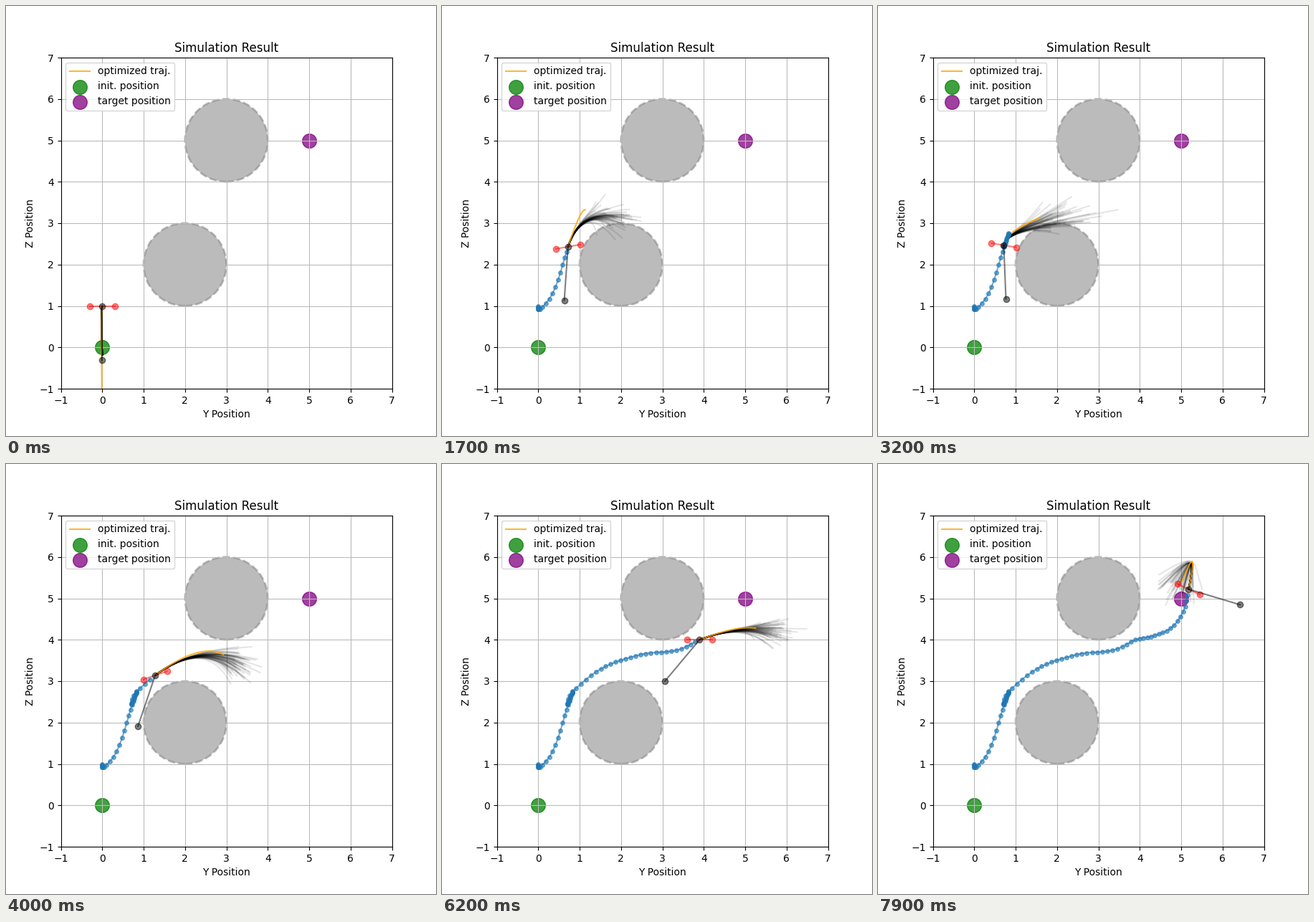
These frames come from a looping animation (600x600 px, 8000 ms). A matplotlib script:

```python
import numpy as np
import matplotlib.pyplot as plt
from matplotlib.animation import FuncAnimation
from matplotlib.collections import LineCollection

FRAMES, STEP_MS = 80, 100
ARM, CABLE = 0.3, 1.3
SAMPLES = 60
LOOKAHEAD = 9                 # steps the plan keeps its present velocity

# step, y, z: waypoints of the flight
PATH = np.array([
    (0, 0, 1), (4, 0, 0.92), (7, 0.1, 0.97), (9, 0.27, 1.17),
    (17, 0.72, 2.43), (24, 0.83, 2.75), (31, 0.71, 2.44), (36, 0.82, 2.73),
    (40, 1.28, 3.14), (50, 2.47, 3.64), (58, 3.46, 3.78), (62, 3.9, 4.0),
    (67, 4.36, 4.1), (72, 4.83, 4.35), (75, 5.05, 4.68), (79, 5.18, 5.22),
])

# step, cable swing, body tilt in degrees
POSE = np.array([
    (0, 0, 0), (9, -10.7, -1.6), (17, -4, 10), (25, 4.6, -24.4),
    (40, -18.7, 19), (50, -84, 8), (62, -40, 0), (66, 0, 3), (72, 55, 12),
    (79, 73.3, -25.8),
])

# step, where the sampled plans and the best plan end, relative to the drone
AIM = np.array([
    (0, 0, -1.2, 0, -2.8), (9, 2.0, 1.45, 0.83, 2.06),
    (25, 0.45, -0.07, 0, -0.28), (33, 1.6, 0.8, 1.0, 0.8),
    (40, 2.1, 0.25, 1.65, 0.5), (50, 1.95, -0.2, 1.8, -0.24),
    (62, 1.85, 0.2, 1.35, 0.28), (72, 0.45, 1.35, 0.3, 1.25),
    (79, -0.3, 0, -0.15, 0.2),
])

T = np.linspace(0, 1, 21)[:, None]


def smooth(table):
    """Cubic Hermite curve through the rows of a table, one value per step."""
    k, v = table[:, 0], table[:, 1:]
    m = np.gradient(v, k, axis=0)
    i = np.arange(FRAMES)
    j = np.clip(np.searchsorted(k, i, "right") - 1, 0, len(k) - 2)
    h = (k[j + 1] - k[j])[:, None]
    s = (i - k[j])[:, None] / h
    return ((1 + 2 * s) * (1 - s) ** 2 * v[j] + s * (1 - s) ** 2 * h * m[j]
            + s * s * (3 - 2 * s) * v[j + 1] + s * s * (s - 1) * h * m[j + 1])


def plan(pos, vel, end):
    """Leave along the velocity, then bend towards the end point."""
    return pos + 2 * T * (1 - T) * LOOKAHEAD * vel + T ** 2 * end


track = smooth(PATH)
velocity = np.gradient(track, axis=0)
pose = np.radians(smooth(POSE))

fig, ax = plt.subplots(figsize=(6, 6), dpi=100)
ax.set_aspect("equal")
ax.set(xlim=(-1, 7), ylim=(-1, 7), title="Simulation Result",
       xlabel="Y Position", ylabel="Z Position")
ax.grid(color="#bbbbbb")

fan = LineCollection([], colors="black", alpha=0.1, linewidths=1.5, zorder=2)
ax.add_collection(fan, autolim=False)
best, = ax.plot([], [], color="orange", alpha=0.8, label="optimized traj.")
for point, color, label in (((0, 0), "green", "init. position"),
                            ((5, 5), "purple", "target position")):
    ax.scatter(*point, s=200, color=color, alpha=0.75, label=label)
for center in ((2, 2), (3, 5)):
    ax.add_patch(plt.Circle(center, 1, color="gray", alpha=0.53,
                            linestyle="--", linewidth=2))
trail, = ax.plot([], [], "o-", color="C0", markersize=4, alpha=0.6)
body, = ax.plot([], [], "o-", color="red", alpha=0.5)
cable, = ax.plot([], [], "o-", color="black", alpha=0.5)
ax.legend(loc="upper left")


def update(i):
    pos, vel = track[i], velocity[i]
    swing, tilt = pose[i]

    arm = ARM * np.array([np.cos(tilt), np.sin(tilt)])
    body.set_data(*np.array([pos - arm, pos + arm]).T)
    load = pos + CABLE * np.array([np.sin(swing), -np.cos(swing)])
    cable.set_data(*np.array([pos, load]).T)
    trail.set_data(*track[:i].T)

    aim = np.array([np.interp(i, AIM[:, 0], col) for col in AIM[:, 1:].T])
    best.set_data(*plan(pos, vel, aim[2:]).T)

    # a slow drone is undecided, so its plans scatter widely sideways
    doubt = np.exp(-(np.hypot(*vel) / 0.05) ** 2)
    spread = min(1, i / 9) * np.array([0.24 + 0.4 * doubt, 0.2])
    ends = np.random.default_rng(i).normal(size=(SAMPLES, 2)) * spread
    mean = plan(pos, vel, aim[:2])
    fan.set_segments([mean + T ** 3 * e for e in ends])
    return fan, best, trail, body, cable


anim = FuncAnimation(fig, update, frames=FRAMES, interval=STEP_MS,
                     repeat=True, repeat_delay=0, blit=False)
plt.show()
```
